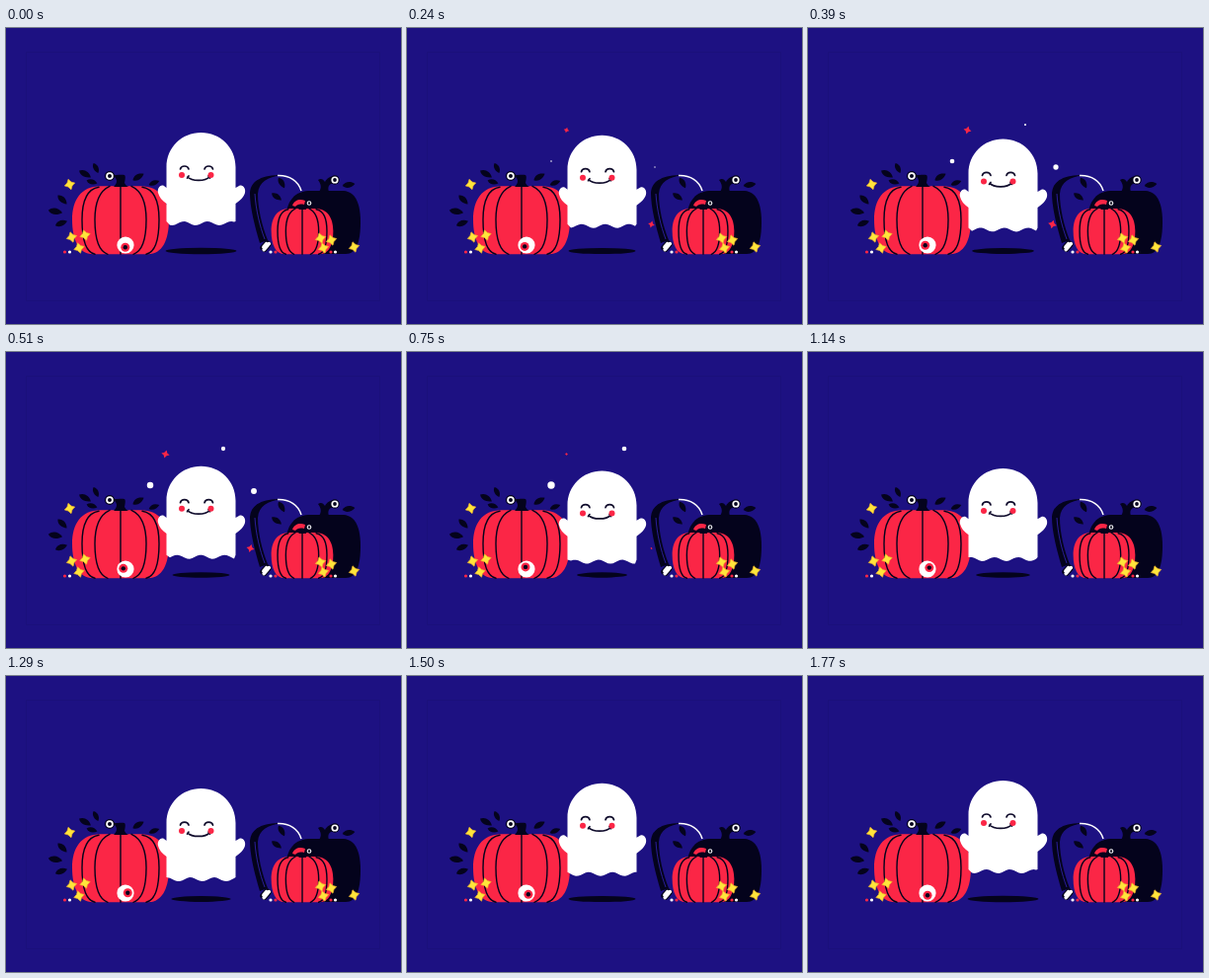
Write an HTML page that moves like this. It is 400x300 px and loops after 1.8 s.

```html
<!DOCTYPE html>
<html lang="en">
<head>
<meta charset="utf-8">
<title>Floating ghost</title>
<style>
html, body { margin: 0; width: 100%; height: 100%; overflow: hidden; background: #1d1182; }
svg { display: block; width: 100vw; height: 100vh; }
.ink { fill: #04031c; }
.red { fill: #fb2646; }
.white { fill: #fff; }
.line { fill: none; stroke: #04031c; stroke-width: 1.4; stroke-linecap: round; vector-effect: non-scaling-stroke; }
.gold { fill: #ffe53b; stroke: #eeb02c; stroke-width: .7; }
</style>
</head>
<body>
<svg viewBox="0 0 400 300">
  <defs>
    <path id="leaf" d="M-8 0C-4-5 3-5 8 0C3 4-4 5-8 0Z"/>
    <path id="spark" d="M0-1L.35-.35L1 0L.35.35L0 1L-.35.35L-1 0L-.35-.35Z" transform="rotate(15)"/>
    <path id="star" d="M-1.500-5.200L1.600-2.400L5.200-1.500L2.500 1.600L1.500 5.200L-1.600 2.500L-5.200 1.500L-2.500-1.600Z"/>
    <path id="ribs" class="line" d="M-22-68C-34-66-39-53-39-35C-39-16-35-2-26 0M-11-69C-22-64-26-52-26-35C-26-17-22-3-13 0"/>
    <g id="pumpkin">
      <path class="red" d="M-18-69H18C40-70 49-55 49-35C49-14 42 0 28 0H-28C-42 0-49-14-49-35C-49-55-40-70-18-69Z"/>
      <use href="#ribs"/>
      <use href="#ribs" transform="scale(-1 1)"/>
      <path class="line" d="M0-69V0"/>
    </g>
    <g id="ring">
      <circle class="ink" r="5"/><circle class="white" r="3.800"/><circle class="ink" r="2"/>
    </g>
  </defs>
  <rect x="20.500" y="24.500" width="358" height="252" fill="none" stroke="#1b107b"/>
  <g id="leaves" class="ink"></g>

  <!-- large pumpkin -->
  <use href="#pumpkin" transform="translate(116 229.300)"/>
  <path class="ink" d="M109 161C112 158 113 155 111 152L107 148C112 150 115 148 120 149C121 150 121 152 120 157C121 159 122 160 124 161Z"/>
  <use href="#ring" transform="translate(105 150)"/>
  <circle class="white" cx="121" cy="220" r="8.600"/>
  <g id="pupil"><circle class="red" r="4.500"/><circle class="ink" r="2.200"/></g>

  <!-- dark pumpkin -->
  <path class="ink" d="M306 165H342C354 166 359 178 359 197C359 216 355 229 344 229H298C288 228 283 215 283 198C283 178 290 166 306 165Z"/>
  <path class="ink" d="M317 166C320 162 319 158 316 154C319 152 321 153 323 156C325 152 329 150 333 150L334 157C328 157 325 160 327 166Z"/>
  <use href="#ring" transform="translate(333 154) scale(.95)"/>

  <!-- crook -->
  <path class="ink" d="M279 149C260 149 248 154 247 167C247 182 252 201 257 218L265 215C259 200 255 182 255 168C256 156 265 151 279 149Z"/>
  <path d="M252 168C253 184 257 201 262 214" fill="none" stroke="#2a1e98" stroke-width="1"/>
  <path d="M275 149.500C287 149 296 155 299 165" fill="none" stroke="#fff" stroke-width="1.500"/>
  <g transform="translate(263 221) rotate(-50)">
    <rect class="ink" x="-6" y="-4" width="12" height="8" rx="3"/>
    <rect class="white" x="-4" y="-2.800" width="8" height="5.600" rx="2"/>
    <circle class="white" cx="-4" cy="1" r="1.800"/><circle class="white" cx="4" cy="1" r="1.800"/>
  </g>

  <!-- small pumpkin -->
  <use href="#pumpkin" transform="translate(300 229.300) scale(.64 .67)"/>
  <path class="ink" d="M296 184C299 181 299 179 298 176H305L304 184Z"/>
  <path class="red" d="M290 180C292 174 298 173 303 175L302 179C297 178 295 179 293 181Z"/>
  <use href="#ring" transform="translate(307 177.500) scale(.6)"/>

  <g id="trims"></g>
  <ellipse id="shadow" class="ink" cx="197.500" cy="226"/>
  <g id="ghost">
    <path id="body" class="white"/>
    <g fill="none" stroke="#100c2c" stroke-width="1.700" stroke-linecap="round">
      <path d="M176.500 37C177.500 33 184 33 185 37M201 37C202 33 208.500 33 209.500 37"/>
      <path d="M184 45C188 49.500 202 49.500 206 45M183.500 46L185 44M206.500 46L205 44"/>
    </g>
    <circle class="red" cx="178" cy="43" r="3"/>
    <circle class="red" cx="207.500" cy="43" r="3"/>
  </g>
  <g id="bits"></g>
</svg>
<script>
const LOOP = 1800, STEP = 30, TAU = Math.PI * 2;
const $ = id => document.getElementById(id);

function add(parent, tag, attrs) {
  const el = document.createElementNS('http://www.w3.org/2000/svg', tag);
  for (const key in attrs) el.setAttribute(key, attrs[key]);
  return $(parent).appendChild(el);
}

// x, y, angle, scale
const leaves = [
  [80, 148, 30, .85], [91, 142, 65, .7], [87, 156, 15, .7],
  [57, 174, 45, .8], [50, 186, 10, .9], [56, 198, -20, .8],
  [134, 151, -30, .8], [150, 157, -20, .7],
  [279, 157, 60, .75], [274, 171, 35, .75], [347, 159, -10, .8]
];
for (const [x, y, turn, size] of leaves)
  add('leaves', 'use', { href: '#leaf', transform: `translate(${x} ${y}) rotate(${turn}) scale(${size})` });

const stars = [[64.5, 158.5], [66.5, 212], [80, 210], [74, 223],
  [318.5, 213], [329.5, 215], [321.5, 223], [352.5, 222]];
for (const [x, y] of stars)
  add('trims', 'use', { href: '#star', class: 'gold', transform: `translate(${x} ${y})` });

const dots = [[59.5, 'red'], [64.5, 'white'], [268, 'white'], [273, 'red'], [329, 'red'], [333.5, 'white']];
for (const [cx, tone] of dots) add('trims', 'circle', { cx, cy: 227, r: 1.6, class: tone });

// x, y, shape, tone, start, peak, end, size
const bits = [
  [161.5, 103.5, 'spark', 'red', 30, 480, 840, 4.3],
  [247.5, 199, 'spark', 'red', 30, 400, 840, 4.5],
  [146, 135, 'dot', 'white', 170, 690, 1110, 3.8],
  [251, 141, 'dot', 'white', 200, 480, 720, 3],
  [220, 98, 'dot', 'white', 300, 660, 930, 2.7]
].map(([x, y, shape, tone, start, peak, end, size]) => ({
  x, y, start, peak, end, size,
  el: shape === 'dot' ? add('bits', 'circle', { r: 1, class: tone })
                      : add('bits', 'use', { href: '#spark', class: tone })
}));

function swell(t, { start, peak, end }) {
  if (t <= start || t >= end) return 0;
  const part = t < peak ? (t - start) / (peak - start) : (end - t) / (end - peak);
  return Math.sin(part * TAU / 4);
}

function bodyPath(lift, phase) {
  const hem = [];
  for (let x = 231; x >= 164; x -= 2.5) {
    const y = 92 + 2 * Math.cos((x - 192) / 24 * TAU + phase);
    hem.push(`L${x} ${y.toFixed(2)}`);
  }
  const y = n => n - lift;
  return `M162.5 35C162.500 15 178 0 197.500 0C217 0 232.500 15 232.500 35V${y(56)}` +
    `L236 ${y(54)}C240 ${y(52)} 243 ${y(57)} 242 ${y(61)}C241 ${y(65)} 237 ${y(69)} 232.500 ${y(72)}` +
    `V90${hem.join('')}L162.500 90V${y(72)}` +
    `C158 ${y(69)} 155 ${y(65)} 154 ${y(61)}C153 ${y(57)} 156 ${y(52)} 160 ${y(54)}L162.500 ${y(56)}Z`;
}

function draw(t) {
  const drop = (1 - Math.cos(Math.min(t, 1740) / 1740 * TAU)) / 2;
  $('ghost').setAttribute('transform', `translate(0 ${106 + 15.3 * drop})`);
  $('body').setAttribute('d', bodyPath(6 * drop, t / LOOP * TAU));
  $('shadow').setAttribute('rx', 36 - 11 * drop);
  $('shadow').setAttribute('ry', 3.2 - .6 * drop);

  const look = (95 / 360 + t / LOOP) * TAU;
  $('pupil').setAttribute('transform',
    `translate(${121 + 2.3 * Math.cos(look)} ${220 + 2.3 * Math.sin(look)})`);

  for (const bit of bits)
    bit.el.setAttribute('transform', `translate(${bit.x} ${bit.y}) scale(${bit.size * swell(t, bit)})`);
}

const begin = performance.now();
function tick() {
  const t = (performance.now() - begin) % LOOP;
  draw(Math.floor(t / STEP) * STEP);
  requestAnimationFrame(tick);
}
tick();
</script>
</body>
</html>
```
